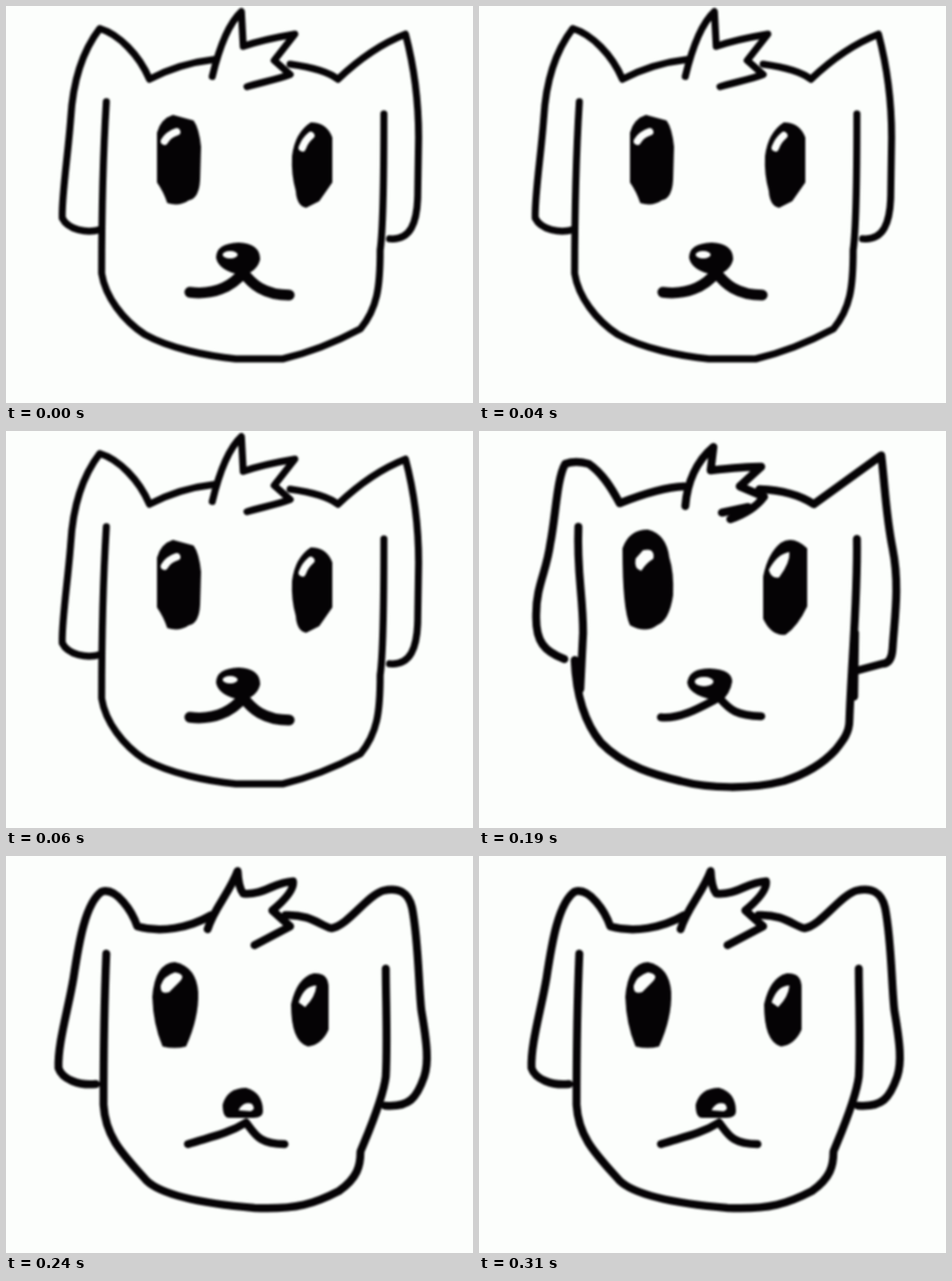
An HTML page that plays this animation: 498x423 px, repeating every 360 ms.

```html
<!DOCTYPE html>
<html lang="en">
<head>
<meta charset="utf-8">
<title>Wobbly puppy</title>
<style>
  html, body { margin: 0; width: 100%; height: 100%; overflow: hidden; background: #fcfefc; }
  svg { display: block; width: 100%; height: 100%; filter: blur(.8px); }
  .pose { visibility: hidden; animation: show 360ms step-end infinite; }
  .second { animation-delay: -240ms; }
  .third { animation-delay: -120ms; }
  @keyframes show {
    0% { visibility: visible; }
    33.3333%, 100% { visibility: hidden; }
  }
  .line { fill: none; stroke: #050305; stroke-width: 8.5; stroke-linecap: round; stroke-linejoin: round; }
  .first .line { stroke-width: 7.5; }
  .first .bold { stroke-width: 11.5; }
  .ink { fill: #050305; }
  .shine { fill: #fcfefc; }
  .glint { fill: none; stroke: #fcfefc; stroke-width: 8; stroke-linecap: round; }
</style>
</head>
<body>
<svg viewBox="0 0 498 423">
  <g class="pose first">
    <!-- ears, head, tuft -->
    <path class="line" d="M101 238C86 243 66 238 60 226C59 205 66 160 69 120C71 85 80 50 100 24C120 30 142 52 153 78C172 68 195 60 222 57"/>
    <path class="line" d="M107 102C104 150 102 200 102 285C106 310 125 335 148 350C175 365 215 373 245 376L295 376C325 369 350 359 378 344C396 322 399 300 399 260C402 240 403 200 403 115"/>
    <path class="line" d="M303 62C325 65 345 71 354 78C375 58 398 41 426 30C434 60 440 100 440 140L439 205C438 230 432 250 409 248"/>
    <path class="line" d="M220 75C226 50 236 20 251 6L253 43C270 37 290 33 308 30L286 58L303 73C290 78 270 82 257 86"/>
    <!-- eyes, nose, mouth -->
    <path class="ink" d="M161 135Q165 120 178 116L200 122Q206 130 208 150L207 185Q206 205 195 207Q185 214 172 210Q168 198 161 188Z"/>
    <path class="ink" d="M305 160Q308 135 325 124Q342 124 348 140V188L334 208L320 215Q310 213 309 197Q304 180 305 160"/>
    <path class="glint" d="M169 144Q173 137 182 134M316 151Q319 143 325 138"/>
    <path class="ink" d="M224 268Q224 253 248 252Q271 253 271 270Q268 283 252 287Q226 282 224 268"/>
    <ellipse class="shine" cx="239" cy="265" rx="8" ry="4"/>
    <path class="line bold" d="M196 305C220 308 240 300 253 284C262 296 275 308 302 308"/>
  </g>

  <g class="pose second">
    <path class="line" d="M91 243C70 235 60 225 61 195C61 165 72 150 76 120C82 90 83 50 92 35C100 32 110 33 117 35C132 45 142 62 150 77C170 69 195 60 219 59"/>
    <path class="line" d="M106 102C104 150 111 175 111 215L108 275M102 244C104 290 116 315 130 332C155 358 190 367 215 373C245 381 290 382 325 373C350 365 368 353 380 340C388 330 395 322 395 308C397 250 404 180 403 115M401 215L400 283"/>
    <path class="line" d="M299 62C325 63 345 70 357 78L429 26C433 60 434 90 441 125C449 165 443 200 441 232Q440 248 430 248L404 255"/>
    <path class="line" d="M220 80C222 55 232 32 250 17L247 42C265 40 285 38 301 38L278 59L304 70C295 82 280 90 268 94M259 87L287 81"/>
    <path class="ink" d="M153 125Q160 105 180 105Q200 110 203 135Q208 150 207 175Q203 202 190 207Q178 216 161 207Q153 190 153 125"/>
    <path class="ink" d="M303 155Q308 130 322 119Q335 111 350 125V187Q340 208 327 217Q312 219 303 200Z"/>
    <path class="shine" d="M167 136L175 127Q188 124 186 136Q178 141 173 149Q165 147 167 136M309 148Q318 131 331 129Q332 140 320 156Q312 158 309 148"/>
    <path class="ink" d="M222 268Q224 253 246 253Q270 254 270 267Q268 280 258 288Q224 283 222 268"/>
    <ellipse class="shine" cx="240" cy="267" rx="10" ry="5"/>
    <path class="line" d="M194 305C215 307 235 295 256 284C268 298 275 303 301 304"/>
  </g>

  <g class="pose third">
    <path class="line" d="M96 243C78 245 60 238 56 226C55 200 66 165 72 130C78 90 85 50 102 38C118 33 135 60 140 75C165 82 195 77 219 63"/>
    <path class="line" d="M107 104C105 150 104 200 104 265C106 300 125 318 150 346C170 365 230 372 265 375C310 377 330 370 355 357C375 343 378 330 378 315C384 300 402 260 405 235C407 200 405 150 405 120"/>
    <path class="line" d="M298 63C325 62 335 74 347 77C365 74 385 42 402 37C418 33 429 38 433 55C440 90 440 140 443 165C449 200 451 220 446 235C438 258 430 268 404 266"/>
    <path class="line" d="M215 78C222 55 238 40 247 16Q248 34 253 40C275 42 285 28 306 27Q308 38 284 58L303 75L265 95"/>
    <path class="ink" d="M156 150Q159 114 180 113Q203 118 205 145Q206 172 192 203Q180 206 167 203Q157 180 156 150"/>
    <path class="ink" d="M304 158Q310 130 328 125Q344 124 344 140V185Q337 201 322 203Q304 198 304 158"/>
    <path class="shine" d="M165 138Q168 128 180 124Q192 126 186 133L174 145Q164 148 165 138M312 156Q318 138 331 138Q330 150 319 161Z"/>
    <path class="ink" d="M231 265Q236 247 256 247Q274 252 274 272Q274 279 264 279H238Q231 279 231 265"/>
    <path class="shine" d="M248 271Q253 261 262 264Q267 269 261 272Z"/>
    <path class="line" d="M194 307C215 300 235 297 256 284C266 297 270 307 297 307"/>
  </g>
</svg>
</body>
</html>
```
